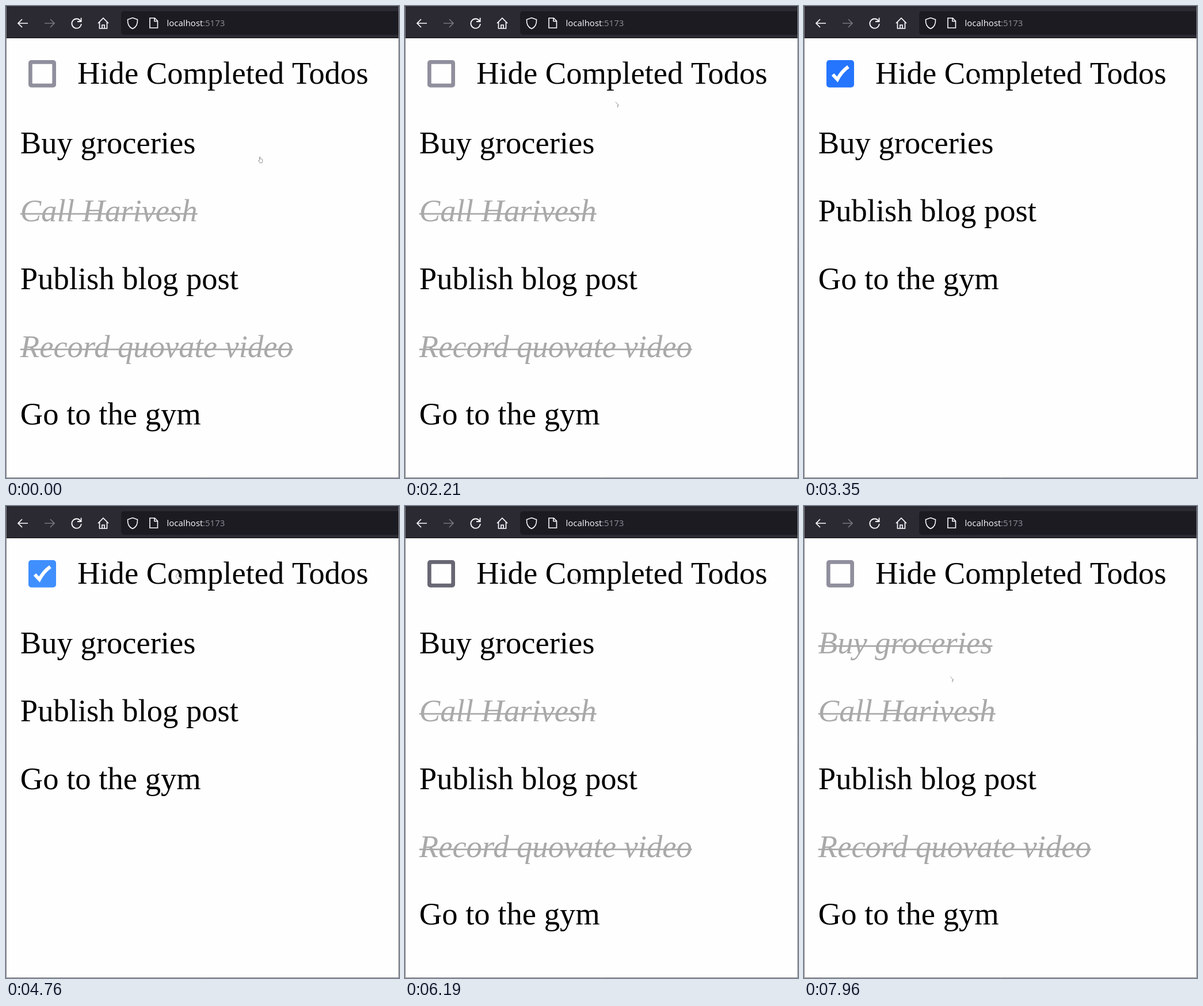
An HTML page with a canvas that plays this animation: 683x820 px, repeating every 8 s.

```html
<!DOCTYPE html>
<html lang="en">
<head>
<meta charset="utf-8">
<title>Todos</title>
<style>
html, body { margin: 0; width: 100%; height: 100%; overflow: hidden; }
canvas { display: block; }
</style>
</head>
<body>
<canvas id="stage" width="683" height="820"></canvas>
<script>
const ctx = document.getElementById('stage').getContext('2d');
const LOOP = 8000;
const STEP = 139; // the pointer is redrawn about seven times a second
const PRESS = 150;
const SERIF = '54.6px "Liberation Serif", serif';
const ICON = '#fbfbfe';
const GREY = '#a9a9a9';

const toggle = { hide: 3200, show: 4760, finish: 7410 };

const todos = [
  { text: 'Buy groceries', doneAt: toggle.finish + PRESS },
  { text: 'Call Harivesh', doneAt: 0 },
  { text: 'Publish blog post', doneAt: Infinity },
  { text: 'Record quovate video', doneAt: 0 },
  { text: 'Go to the gym', doneAt: Infinity },
];

// Each move eases from the previous resting place; the powers bend its path
const home = { x: 438, y: 261 };
const moves = [
  { x: 299, y: 121, at: 1380, steps: 10, bendX: 1.5, bendY: 0.9 },
  { x: 254, y: 234, at: 6190, steps: 8, bendX: 0.8, bendY: 1 },
  { x: 254, y: 296, at: 7820, steps: 2, bendX: 1, bendY: 1 },
];

const within = (t, from, to) => t >= from && t < to;
const mix = (a, b, k) => a + (b - a) * k;
const smooth = u => u * u * (3 - 2 * u);

function pointerAt(t) {
  return moves.reduce((from, to) => {
    if (t < to.at) return from;
    const step = Math.floor((t - to.at) / STEP) + 1;
    const eased = smooth(Math.min(1, step / to.steps));
    return {
      x: mix(from.x, to.x, eased ** to.bendX),
      y: mix(from.y, to.y, eased ** to.bendY),
    };
  }, home);
}

function rect(color, x, y, w, h) {
  ctx.fillStyle = color;
  ctx.fillRect(x, y, w, h);
}

function roundBox(color, x, y, w, h, r) {
  ctx.fillStyle = color;
  ctx.beginPath();
  ctx.roundRect(x, y, w, h, r);
  ctx.fill();
}

function line(d, color, width) {
  ctx.strokeStyle = color;
  ctx.lineWidth = width;
  ctx.stroke(new Path2D(d));
}

function label(text, x, y, font, color) {
  ctx.font = font;
  ctx.fillStyle = color;
  ctx.fillText(text, x, y);
}

function drawToolbar() {
  rect('#2b2a33', 0, 0, 683, 56);
  rect('#1c1b22', 0, 0, 683, 2);
  rect('#0c0c0d', 0, 55, 683, 1);
  roundBox('#1c1b22', 200, 9, 490, 41, 5);
  line('M38 30H21M28 23L21 30L28 37', ICON, 1.7);
  line('M67 30H84M77 23L84 30L77 37', '#77767c', 1.7);
  line('M129.5 26A8.2 8.2 0 1 0 130.8 31M130.6 20.5V27H124', ICON, 1.8);
  line('M160 30L169 21L178 30M162.5 28V39H175.5V28M167 39V33H171V39', ICON, 1.7);
  line('M220 20.5L228.5 23.5C229 31 226 37 220 39.5C214 37 211 31 211.5 23.5Z', ICON, 1.6);
  line('M250 21H258.5L263.5 26V38H250ZM258 21V26.5H263.5', ICON, 1.6);
  const font = '15px "Open Sans", sans-serif';
  label('localhost', 279.5, 35, font, ICON);
  label(':5173', 342, 35, font, '#8f8f98');
}

function drawCheckbox(checked, hover, pressed) {
  if (checked) {
    roundBox(pressed ? '#408fff' : '#2575ff', 39, 94, 48, 47.5, 5);
    line('M50 119L58 127.5Q65 114 77 105.5', '#fff', 6);
  } else {
    roundBox(hover ? '#676774' : '#8f8f9d', 39, 94, 48, 47.5, 5);
    roundBox('#fefefe', 45.7, 100.7, 34.6, 34.1, 1);
  }
}

function drawTodos(t, hideDone) {
  const visible = todos.filter(todo => !hideDone || t < todo.doneAt);
  visible.forEach(({ text, doneAt }, row) => {
    const y = 256.4 + row * 117.75;
    const done = t >= doneAt;
    label(text, 24.8, y, (done ? 'italic ' : '') + SERIF, done ? GREY : '#000');
    if (done) rect(GREY, 24.8, y - 14.4, ctx.measureText(text).width, 2.7);
  });
}

function drawPointer({ x, y }, pressed) {
  const overTodo = within(y, 207, 268);
  ctx.save();
  ctx.translate(x, y);
  ctx.fillStyle = '#fff';
  if (overTodo) {
    const hand = 'M2.5 7V1.5Q3.2 .4 4 1.5V4.5L7 5.2Q8 5.5 7.8 7L7 11.5H3.2L.8 7.8Q.6 6.5 2.5 7.5';
    ctx.fill(new Path2D(hand));
    line(hand, '#777', 0.8);
  } else {
    ctx.fill(new Path2D('M0 0V8.5L2 7L3.3 9.8L4.7 9.2L3.5 6.5L6 6.2Z'));
    line('M.3 .5L6 6.2L3.5 6.5L4.7 9.2L3.3 9.8', '#888', 0.9);
  }
  if (pressed) {
    ctx.beginPath();
    ctx.arc(overTodo ? 4 : 1, overTodo ? 2.5 : 1, 4.5, 0, Math.PI * 2);
    ctx.lineWidth = 0.8;
    ctx.stroke();
  }
  ctx.restore();
}

function draw(now) {
  const t = now % LOOP;
  const pointer = pointerAt(t);
  const pressed = Object.values(toggle).some(at => within(t, at, at + PRESS));
  const hideDone = within(t, toggle.hide + PRESS, toggle.show + PRESS);
  rect('#fefefe', 0, 0, 683, 820);
  drawToolbar();
  drawCheckbox(hideDone, pointer.y < 148, pressed);
  label('Hide Completed Todos', 124, 134.8, SERIF, '#000');
  drawTodos(t, hideDone);
  drawPointer(pointer, pressed);
  line('M.5 0V819.5H682.5V0', '#858588', 1);
  rect('#45444d', 0, 0, 683, 1);
}

const start = performance.now();
function tick() {
  draw(performance.now() - start);
  requestAnimationFrame(tick);
}
tick();
</script>
</body>
</html>
```
